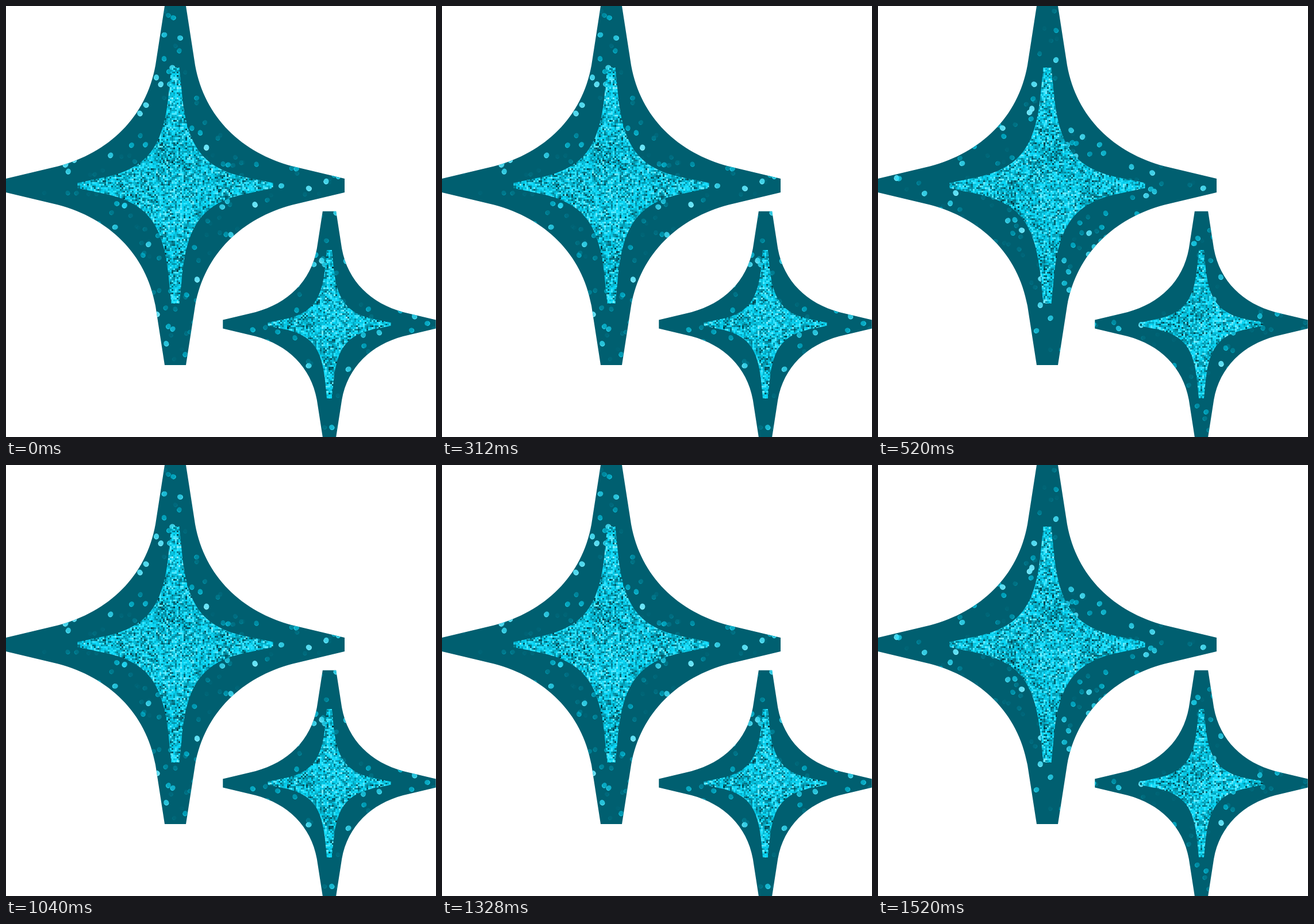
Animation, 748 px wide and 749 px high, one loop 2 s. Source, as an HTML page with a canvas:

```html
<!DOCTYPE html>
<html lang="en">
<head>
<meta charset="utf-8">
<title>Glitter stars</title>
<style>
  html, body { margin: 0; width: 100%; height: 100%; overflow: hidden; background: #fff; }
  canvas { display: block; }
</style>
</head>
<body>
<canvas id="stage" width="748" height="749"></canvas>
<script>
const W = 748, H = 749, CELL = 3, DISCS = 780;
const ctx = document.getElementById('stage').getContext('2d');

// One quadrant of each outline, from the upper tip to the side tip.
const OUTER = [[18.5, 312], [34.5, 209], [51, 118], [116, 57], [204, 33.5], [294.5, 12]];
const INNER = [[7, 205], [12.5, 150], [22, 71], [46, 33], [115, 16], [170, 4.5]];
const STARS = [[294.5, 312, 1], [562.5, 553, 0.629]];

function randomFrom(seed) {
  return () => {
    seed = (seed + 0x6D2B79F5) | 0;
    let n = Math.imul(seed ^ (seed >>> 15), 1 | seed);
    n = (n + Math.imul(n ^ (n >>> 7), 61 | n)) ^ n;
    return ((n ^ (n >>> 14)) >>> 0) / 4294967296;
  };
}

function starPath(quadrant) {
  const path = new Path2D();
  for (const [cx, cy, scale] of STARS) {
    const corner = (sx, sy, flip) => {
      const p = quadrant.map(([x, y]) => [cx + sx * x * scale, cy - sy * y * scale]);
      return flip ? p.reverse() : p;
    };
    [corner(1, 1), corner(1, -1, true), corner(-1, -1), corner(-1, 1, true)].forEach((p, i) => {
      path[i ? 'lineTo' : 'moveTo'](...p[0]);
      path.lineTo(...p[1]);
      path.bezierCurveTo(...p[2], ...p[3], ...p[4]);
      path.lineTo(...p[5]);
    });
    path.closePath();
  }
  return path;
}

// A soft disc with a lighter crescent; stronger ones are larger and paler.
function disc(g, x, y, strength, tilt) {
  const r = 3.8 + 1.5 * strength;
  const light = 40 + 32 * strength ** 3;
  g.globalAlpha = 0.04 + 0.9 * strength ** 1.7;
  g.fillStyle = `hsl(188 100% ${light}%)`;
  g.beginPath();
  g.ellipse(x, y, r, r * 0.88, tilt, 0, 7);
  g.fill();
  g.strokeStyle = `hsl(187 100% ${light + 8}%)`;
  g.beginPath();
  g.arc(x, y, r - 1, tilt - 1, tilt + 1.6);
  g.stroke();
  g.globalAlpha = 1;
}

function paint(seed) {
  const canvas = document.createElement('canvas');
  canvas.width = W;
  canvas.height = H;
  const g = canvas.getContext('2d'), random = randomFrom(seed);
  g.fillStyle = '#fff';
  g.fillRect(0, 0, W, H);

  g.save();
  g.clip(starPath(OUTER));
  g.fillStyle = '#005f70';
  g.fillRect(0, 0, W, H);
  for (let i = 0; i < DISCS; i++) disc(g, random() * W, random() * H, random(), random() * 3);
  g.restore();

  // Cell glitter, slightly brighter and darker in broad patches.
  g.clip(starPath(INNER));
  for (let y = 0; y < H; y += CELL) {
    for (let x = 0; x < W; x += CELL) {
      const patch = 4 * Math.sin(x / 23 + seed) * Math.sin(y / 31);
      const light = 14 + 31 * (random() + random()) + patch;
      g.fillStyle = `hsl(188 ${light > 55 ? 100 : 94}% ${light}%)`;
      g.fillRect(x, y, CELL, CELL);
    }
  }
  return canvas;
}

const pictures = [11, 29].map(paint);
const start = performance.now();

function draw() {
  const t = (performance.now() - start) % 2000;
  const second = (t >= 520 && t < 1040) || t >= 1520;
  ctx.drawImage(pictures[+second], 0, 0);
  requestAnimationFrame(draw);
}
draw();
</script>
</body>
</html>
```
